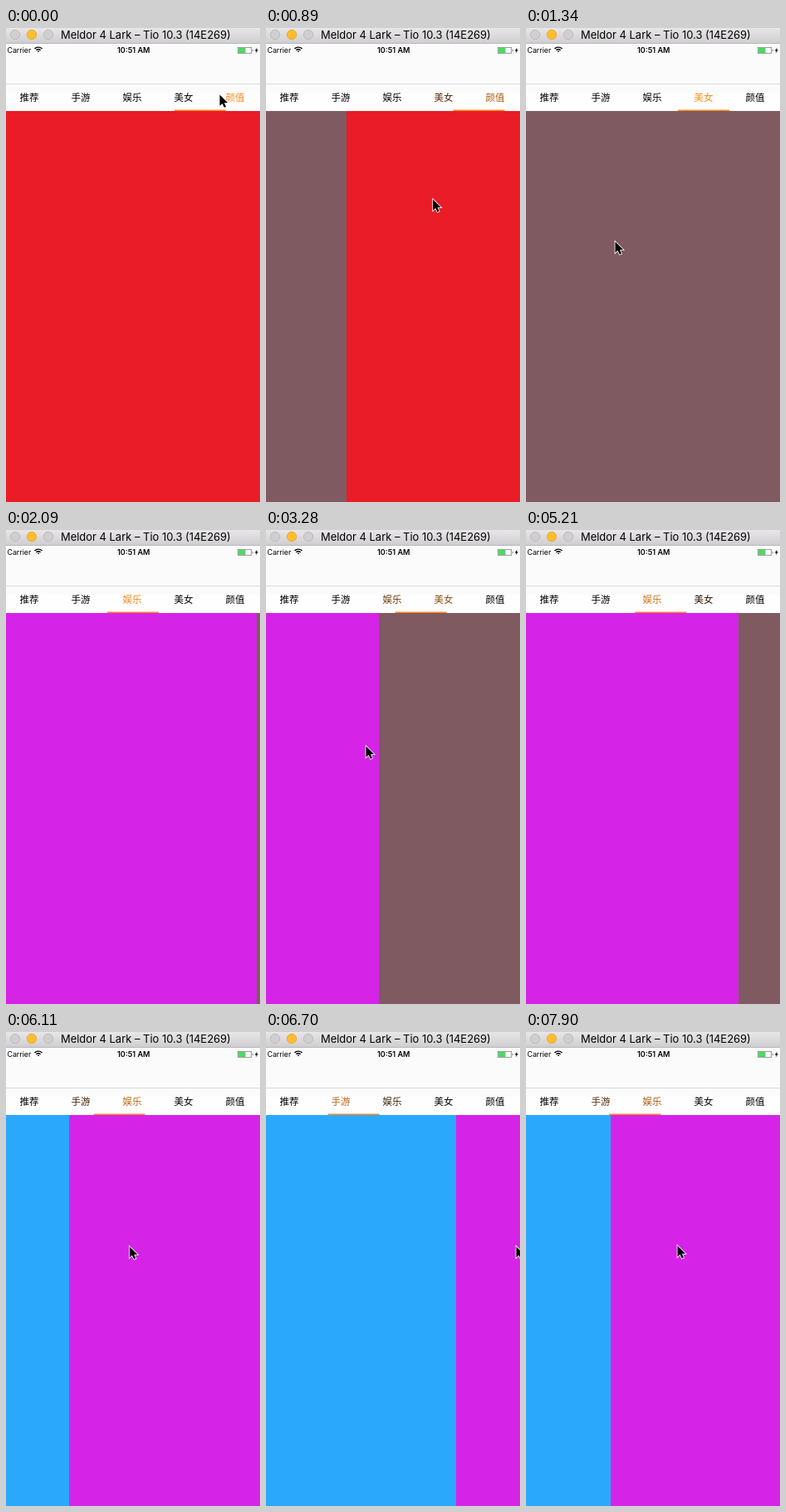
Animation of 306x571 px, one loop 8 s. Source, as an HTML page with a canvas:

```html
<!DOCTYPE html>
<html lang="zh-CN">
<head>
<meta charset="utf-8">
<style>
html, body { margin: 0; width: 306px; height: 571px; overflow: hidden; background: #fff; }
canvas { display: block; }
</style>
</head>
<body>
<canvas id="stage" width="306" height="571"></canvas>
<script>
const ctx = document.getElementById('stage').getContext('2d');
const W = 306, H = 571, TOP = 100, TAB = 62, LOOP = 8000, STEP = 148.8;
const ORANGE = [250, 138, 28];
const tabs = ['推荐', '手游', '娱乐', '美女', '颜值'];
const pages = ['#fff', '#2aa9fc', '#d524e8', '#7f5a60', '#e91c27'];

// Pointer drags in steps; the scroll follows the pointer, then settles on `page` if released.
const drags = [
  { start: -1, end: 0, from: 257, to: 257, y: 80 },
  { start: 4, end: 7, from: 104, to: 394, y: 206, page: 3 },
  { start: 9, end: 12, from: 107, to: 184, y: 257, page: 2 },
  { start: 17, end: 26, from: 290, to: -16, y: 260, page: 3 },
  { start: 32, end: 35, from: 56, to: 312, y: 282, page: 2 },
  { start: 39, end: 45, from: 72, to: 301, y: 258 },
  { start: 48, end: 53, from: 309, to: 182, y: 257 }
];
const SETTLE = 0.13, OVERSHOOT = 100;

const mix = (a, b, p) => a + (b - a) * p;

function scrollAt(k) {
  let scroll = 4 * W;
  drags.forEach((d, i) => {
    if (k < d.start) return;
    const p = Math.min(1, (k - d.start) / (d.end - d.start));
    scroll -= (d.to - d.from) * p;
    if (d.page === undefined || k <= d.end) return;
    const next = drags[i + 1].start;
    const left = k < next ? SETTLE ** (k - d.end) : 0;
    scroll = mix(d.page * W, scroll, left);
  });
  return scroll;
}

function pointerAt(k) {
  const i = drags.findLastIndex(d => k >= d.start);
  const d = drags[i], next = drags[i + 1];
  if (k <= d.end || !next) {
    return [mix(d.from, d.to, (k - d.start) / (d.end - d.start)), d.y];
  }
  // Travel to the next drag, first carried on by the flick.
  const p = 1 - (1 - (k - d.end) / (next.start - d.end)) ** 3;
  const flick = d.page === undefined ? 0 : OVERSHOOT * Math.sign(d.to - d.from);
  return [mix(d.to, next.from, p) + flick * Math.sin(Math.PI * p), mix(d.y, next.y, p)];
}

function rect(color, x, y, w, h) {
  ctx.fillStyle = color;
  ctx.fillRect(x, y, w, h);
}

function text(str, x, y, font, color = '#000') {
  ctx.font = font;
  ctx.fillStyle = color;
  ctx.fillText(str, x, y);
}

function polygon(points, x, y, scale = 1) {
  ctx.beginPath();
  points.forEach(([px, py]) => ctx.lineTo(x + px * scale, y + py * scale));
  ctx.closePath();
}

function drawTitleBar() {
  const shade = ctx.createLinearGradient(0, 0, 0, 18);
  shade.addColorStop(0, '#e8e6e8');
  shade.addColorStop(1, '#d0ced0');
  rect(shade, 0, 0, W, 18);
  rect('#b9b7b9', 0, 18, W, 1);
  [['#d0ced0', '#b7b5b7'], ['#fdbd2e', '#e2a32a'], ['#d0ced0', '#b7b5b7']].forEach(([fill, line], i) => {
    ctx.beginPath();
    ctx.arc(11 + 20 * i, 8, 5.7, 0, 7);
    ctx.fillStyle = fill;
    ctx.fill();
    ctx.strokeStyle = line;
    ctx.lineWidth = 0.8;
    ctx.stroke();
  });
  text('Meldor 4 Lark – Tio 10.3 (14E269)', 66, 13, '12.95px Inter, sans-serif');
}

function drawStatusBar() {
  rect('#fbfbfb', 0, 19, W, 59);
  rect('#fefefe', 0, 78, W, 22);
  rect('#dadada', 0, 67, W, 1);
  text('Carrier', 1.5, 30, '8.8px Inter, sans-serif');
  text('10:51 AM', 134, 30, '600 9.1px Inter, sans-serif');
  ctx.strokeStyle = '#000';
  ctx.lineWidth = 1.4;
  for (const r of [1, 3.6, 6.2]) {
    ctx.beginPath();
    ctx.arc(39, 29.3, r, -Math.PI * 0.76, -Math.PI * 0.24);
    ctx.stroke();
  }
  ctx.strokeStyle = '#777';
  ctx.lineWidth = 0.7;
  ctx.strokeRect(279.3, 23.4, 16.4, 7);
  rect('#4cd964', 280, 24, 8.5, 6);
  rect('#777', 296.6, 25.8, 1, 2.4);
  polygon([[2.8, 0], [0, 4], [1.8, 4], [1, 7], [4, 2.8], [2.2, 2.8]], 299.8, 23.4);
  ctx.fillStyle = '#000';
  ctx.fill();
}

function drawTabs(pos, barPos) {
  tabs.forEach((name, i) => {
    const near = Math.max(0, 1 - Math.abs(pos - i));
    const color = `rgb(${ORANGE.map(c => Math.round(c * near))})`;
    text(name, 16.5 + TAB * i, 88, '11.5px "Noto Sans CJK SC", "Noto Sans CJK", sans-serif', color);
  });
  rect(`rgb(${ORANGE})`, barPos * TAB - 3, 98.5, TAB, 1.5);
}

function drawPointer(x, y) {
  polygon([[0, 0], [0, 14.5], [3.4, 11.4], [5.8, 16.6], [8.2, 15.5], [5.9, 10.5], [10.4, 10.3]], x + 0.5, y + 0.5, 0.92);
  ctx.strokeStyle = '#fff';
  ctx.lineWidth = 1.6;
  ctx.stroke();
  ctx.fillStyle = '#000';
  ctx.fill();
}

function draw(now) {
  const k = Math.min(53, Math.floor((now % LOOP) / STEP));
  const scroll = scrollAt(k), pos = scroll / W;
  drawTitleBar();
  drawStatusBar();
  pages.forEach((color, i) => rect(color, Math.round(i * W - scroll), TOP, W, H - TOP));
  // The bar is still sliding to the tapped tab at the start.
  drawTabs(pos, Math.min(pos, 3.32 + k));
  drawPointer(...pointerAt(k));
}

const start = performance.now();
function tick() {
  draw(performance.now() - start);
  requestAnimationFrame(tick);
}
tick();
</script>
</body>
</html>
```
